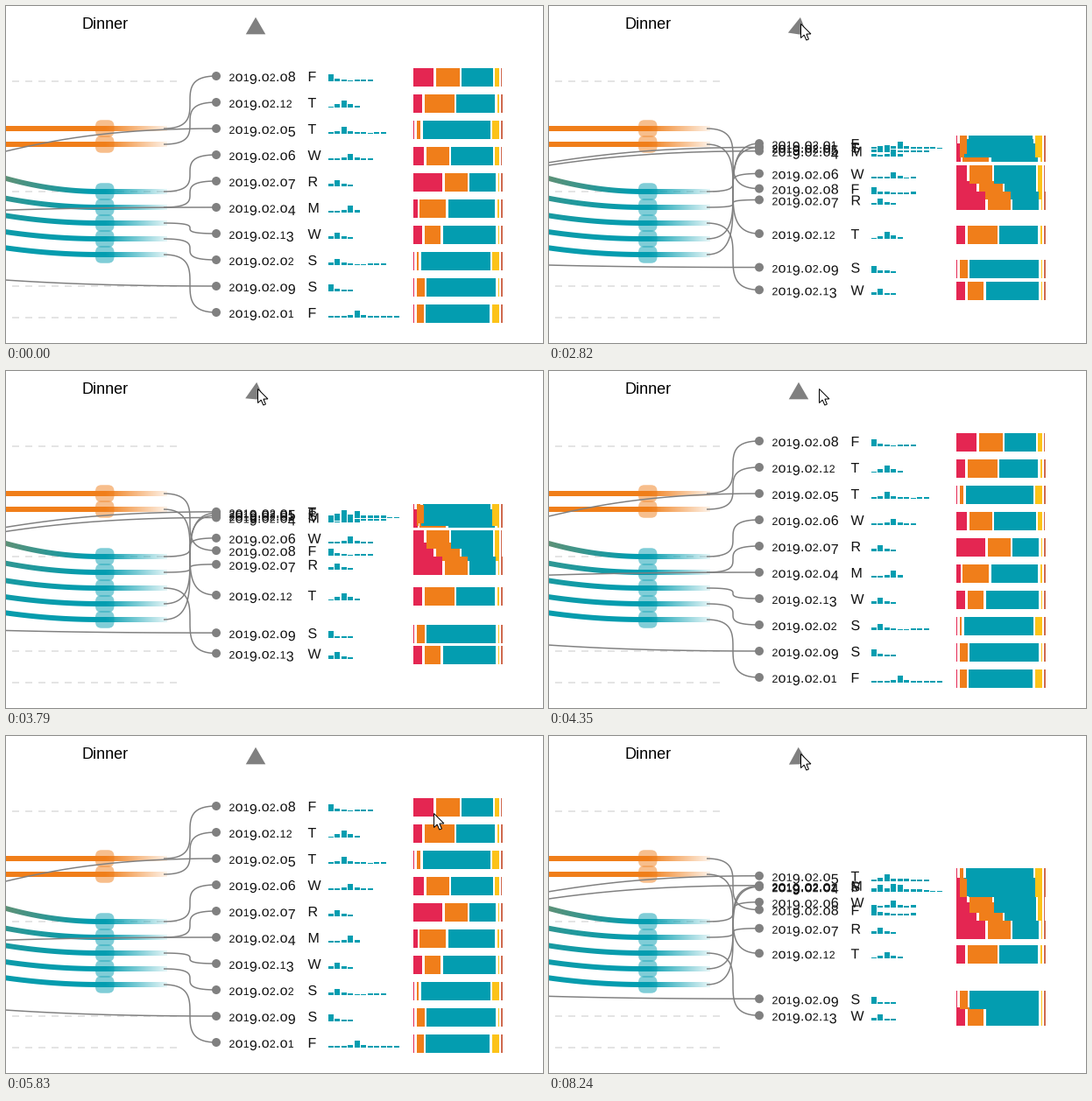
A matplotlib script that plays this animation: 613x385 px, repeating every 8.29 s.

```python
import numpy as np
import matplotlib.pyplot as plt
from matplotlib.animation import FuncAnimation
from matplotlib.collections import LineCollection, PathCollection
from matplotlib.patches import FancyBboxPatch, Polygon
from matplotlib.path import Path
from matplotlib.textpath import TextPath
from matplotlib.transforms import IdentityTransform

W, H = 613, 385
LOOP, TICK = 8290, 10
PX = 0.72  # one pixel in points at 100 dpi
FONT = "Liberation Sans"

RED, ORANGE, TEAL, YELLOW, RUST = "#e42652", "#f07e1a", "#039db0", "#fcc319", "#cf6a4f"
SHARES = (RED, ORANGE, TEAL, YELLOW, RUST)
GREY = "#808080"
WARM, COOL = np.array([240, 126, 26]) / 255, np.array([3, 157, 176]) / 255

# day of month, red share, orange share, number of small bars, tallest bar
ROWS = [(8, 23, 27, 7, 0), (12, 10, 34, 5, 2), (5, 1, 4.5, 9, 2), (6, 12, 26, 7, 3),
        (7, 33, 26, 4, 1), (4, 4.5, 30, 5, 3), (13, 10, 18.5, 4, 1), (2, 1, 2.5, 9, 1),
        (9, 1, 9, 4, 0), (1, 1, 8, 11, 4)]
DAYS = [row[0] for row in ROWS]
HOME = 80 + 30 * np.arange(len(ROWS))
SORTED = 80 + 30 * np.argsort(np.argsort(DAYS))

# days without dinner: how many meals back their line starts
SKIPPED = {5: 1, 4: 2, 9: 2}
NODES = [140 + 18 * k + 36 * (k > 1) for k in range(7)]

# pointer tip: time, x, y
TRAIL = [(1150, 409, 1), (1660, 277, 48), (1940, 287, 27), (2070, 287, 20),
         (4340, 287, 20), (4350, 308, 20), (4810, 470, 84), (5830, 488, 88),
         (6240, 488, 88), (6390, 490, 77), (6570, 490, 77), (6930, 578, 121),
         (7350, 578, 121), (7360, 330, 5), (7670, 287, 20)]
SHOWN = [(1150, 6980), (7360, LOOP)]


def ease(u):
    u = min(max(u, 0), 1)
    return 4 * u**3 if u < 0.5 else 1 - 4 * (1 - u) ** 3


def move(t, start, first, step):
    """Progress of a 500 ms transition, redrawn every `step` ms."""
    shown = first + (t - first) // step * step
    return ease((shown - start) / 500)


def sort_amount(t):
    return (move(t, 2527, 2540, 46.6) - move(t, 3578, 3610, 45)
            + move(t, 7960, 7950, 48.3))


def glyphs(text, x, y, size):
    return TextPath((x, y), text, size=size, prop={"family": FONT})


def old_style(text, x, y, size=16):
    """Old-style figures: 0, 1, 2 at x-height, 3, 4, 5, 7, 9 below the line."""
    parts = []
    for ch in text:
        scale = 0.77 if ch in "12" else 1
        drop = 3 if ch in "34579" else 0
        parts.append(glyphs("o" if ch == "0" else ch, x, y - drop, size * scale))
        x += size * scale * (0.278 if ch == "." else 0.556) + 0.25
    return parts


def rect(x, y, w, h):
    return Path([(x, y), (x + w, y), (x + w, y + h), (x, y + h), (x, y)], closed=True)


fig = plt.figure(figsize=(W / 100, H / 100), dpi=100, facecolor="white")
ax = fig.add_axes([0, 0, 1, 1])
ax.axis("off")


def band_image(width=184):
    """Bands bend down into the dinner column and fade out behind it."""
    x = np.arange(width) + 0.5
    y = np.arange(H)[:, None] + 0.5
    img = np.zeros((H, width, 4))
    fade = np.interp(x, [113, width], [1, 0.1])
    for k, level in enumerate(NODES, -2):
        drop = 7.5 + 7.5 * np.exp(-k) if k >= 0 else 0
        warmth = 0.38 / 2**k * np.clip(1 - x / 95, 0, 1) if k >= 0 else np.ones(width)
        mid = level - drop * np.clip(1 - x / 108, 0, 1) ** 2
        cover = np.clip(3.5 - abs(y - mid), 0, 1) * fade
        rgb = COOL + warmth[:, None] * (WARM - COOL)
        img[..., :3] = np.where(cover[..., None] > 0, rgb, img[..., :3])
        img[..., 3] = np.maximum(img[..., 3], cover)
    return img


for y in (86, 212, 320, 356):
    dashes = [[(x, y), (x + 7.5, y)] for x in np.arange(7, 190, 15)]
    ax.add_collection(LineCollection(dashes, colors="#e4e4e4", linewidths=2 * PX, zorder=0))

bands = band_image()
ax.imshow(bands, extent=(0, bands.shape[1], H, 0), aspect="auto",
          interpolation="nearest", zorder=1)
for level in NODES:
    ax.add_patch(FancyBboxPatch(
        (102, level - 9.75), 21.5, 19.5, boxstyle="round,pad=0,rounding_size=7",
        fc=ORANGE if level < 200 else TEAL, alpha=0.5, lw=0, zorder=2))
ax.text(86, 26, "Dinner", family=FONT, size=18 * PX, va="baseline", zorder=3)

ax.set_xlim(0, W)
ax.set_ylim(H, 0)


def moving(shapes, zorder):
    """Shapes in pixels, as (path, row, colour), that ride on their row's height."""
    paths, rows, colors = zip(*shapes)
    coll = PathCollection(paths, offset_transform=ax.transData, facecolors=colors,
                          linewidths=0, zorder=zorder)
    coll.set_transform(IdentityTransform())
    ax.add_collection(coll, autolim=False)
    return coll, np.array(rows)


rng = np.random.default_rng(4)
nodes = iter(NODES)
dots, labels, bars, stack, sources = [], [], [], [], []
for i, (day, red, orange, count, peak) in enumerate(ROWS):
    dots.append((Path.circle((240, 0), 5), i, GREY))
    text = old_style(f"2019.02.{day:02}", 254.5, -6)
    text.append(glyphs("FSSMTWR"[(day - 1) % 7], 344.5, -6, 16))
    labels.append((Path.make_compound_path(*text), i, "#111111"))

    for k in range(count):
        h = 1.8 + 5.7 * np.exp(-1.5 * (k - peak) ** 2) + rng.uniform(-0.6, 0.6)
        bars.append((rect(367.5 + 7.5 * k, -6, 6.3, h), i, TEAL))

    yellow, rust = min(count**2 / 10 - 0.5, 8), 1.3
    teal = 91.5 - red - orange - yellow - rust
    x = 465
    for w, color in zip((red, orange, teal, yellow, rust), SHARES):
        stack.append((rect(x, -12, w, 21), i, color))
        x += w + 2.5

    if day in SKIPPED:
        sources.append((-110 - 185 * SKIPPED[day], 142 + 0.45 * HOME[i]))
    else:
        sources.append((180, next(nodes)))

riders = [moving(dots, 5), moving(labels + bars + stack, 6)]

links = LineCollection([], colors=GREY, linewidths=1.5 * PX, zorder=4)
ax.add_collection(links, autolim=False)

CORNERS = np.radians([-90, 30, 150])
arrow = Polygon(np.zeros((3, 2)), fc=GREY, lw=0, zorder=7)
ax.add_patch(arrow)

POINTER = np.array([(0, 0), (0, 16), (3.7, 12.6), (6.3, 18.5),
                    (8.9, 17.4), (6.4, 11.6), (11.4, 11.4)]) + 0.5
pointer = Polygon(POINTER, fc="white", ec="black", lw=PX, zorder=8)
ax.add_patch(pointer)

S = np.linspace(0, 1, 40)
BEZIER = np.c_[(1 - S) ** 3, 3 * S * (1 - S) ** 2, 3 * S**2 * (1 - S), S**3]
TRAIL_T, TRAIL_X, TRAIL_Y = np.array(TRAIL, float).T


def link(sx, sy, y, end=240):
    reach = max(60, (end - sx) / 2)
    return BEZIER @ [(sx, sy), (sx + reach, sy), (end - reach, y), (end, y)]


def update(n):
    t = n * TICK
    p = sort_amount(t)
    ys = HOME + (SORTED - HOME) * p
    for coll, rows in riders:
        coll.set_offsets(np.c_[np.zeros(len(rows)), ys[rows]])
    links.set_segments([link(*source, y) for source, y in zip(sources, ys)])
    turn = CORNERS + np.pi * p
    arrow.set_xy(np.c_[285 + 13 * np.cos(turn), 25.8 + 13 * np.sin(turn)])
    tip = np.interp(t, TRAIL_T, TRAIL_X), np.interp(t, TRAIL_T, TRAIL_Y)
    pointer.set_xy(POINTER + np.round(tip))
    pointer.set_visible(any(a <= t < b for a, b in SHOWN))
    return []


anim = FuncAnimation(fig, update, frames=LOOP // TICK, interval=TICK,
                     repeat=True, repeat_delay=0, cache_frame_data=False)
plt.show()
```
